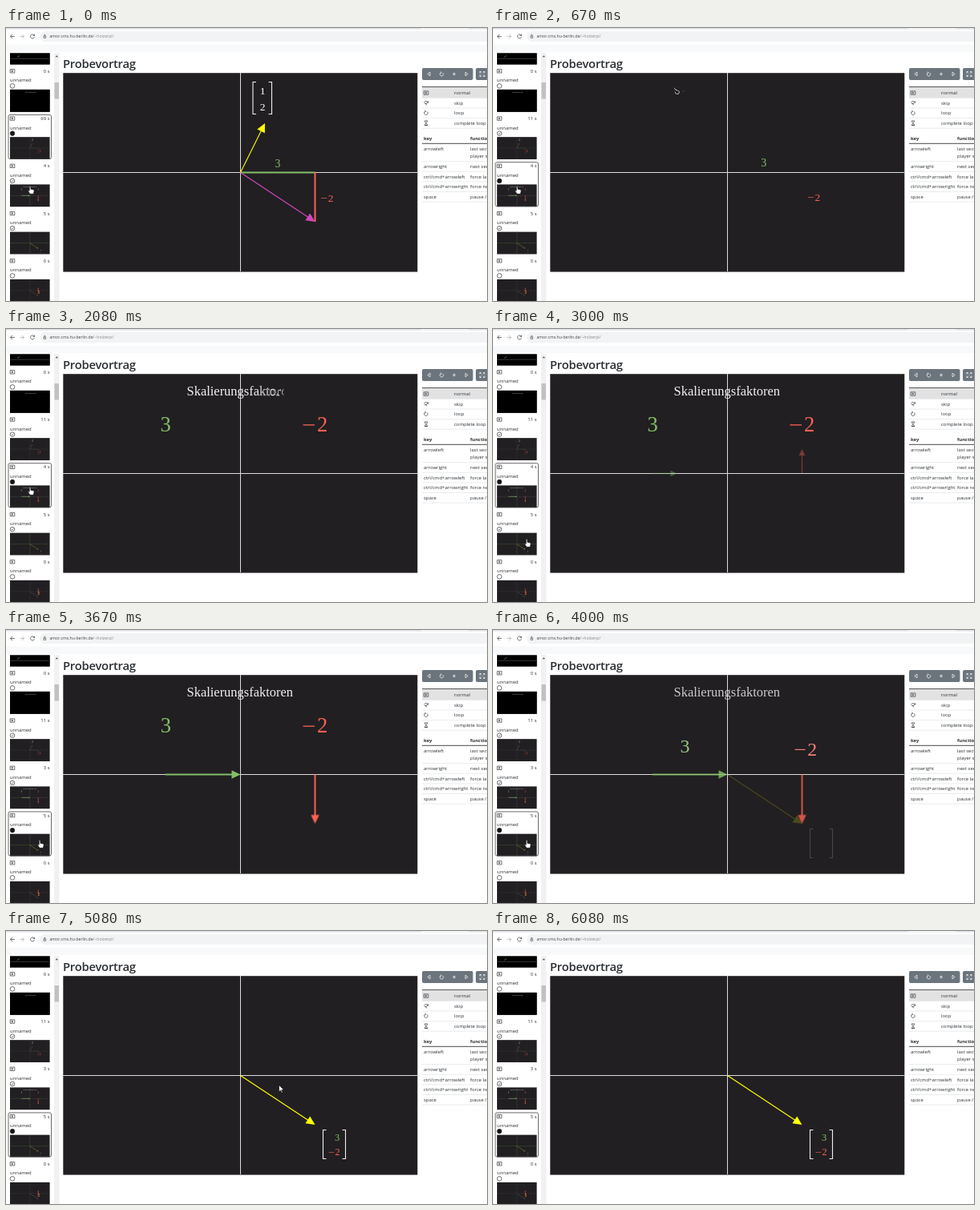
An HTML page that plays this animation: 600x341 px, repeating every 6160 ms.

```html
<!DOCTYPE html>
<html lang="de">
<head>
<meta charset="utf-8">
<title>Probevortrag</title>
<style>
html, body { margin: 0; width: 100%; height: 100%; overflow: hidden; background: #fff; }
svg { display: block; width: 100vw; height: 100vh; }
text { font-family: "Open Sans", "Noto Sans", sans-serif; font-size: 5.95px; fill: #2b2f33; }
.math text, text.math { font-family: "Liberation Serif", serif; }
.icon { fill: none; stroke: #33373b; stroke-width: .7; }
</style>
</head>
<body>
<svg id="stage" viewBox="0 0 600 341"></svg>
<script>
const LOOP = 6160, CLICK_1 = 500, CLICK_2 = 3480;
const WRITE = 580, FADE_IN = 2540, COMBINE = 3644;
const GREEN = '#83c167', RED = '#fc6255', YELLOW = '#ffff00', PINK = '#d147bd';
const DARK = '#211f22', TITLE = 'Skalierungsfaktoren';
const stage = document.getElementById('stage');

const clamp = v => Math.max(0, Math.min(1, v));
const lerp = (a, b, k) => a + (b - a) * k;
const sigmoid = v => 1 / (1 + Math.exp(-v));
const smooth = v => {
  const e = sigmoid(-5);
  return clamp((sigmoid(10 * (clamp(v) - .5)) - e) / (1 - 2 * e));
};
const ease = v => { v = clamp(v); return v * v * (3 - 2 * v); };
const pale = (hex, k) => 'rgb(' + [1, 3, 5].map(i =>
  Math.round(lerp(parseInt(hex.slice(i, i + 2), 16), 225, k))) + ')';

const rect = (x, y, w, h, fill, extra = '') =>
  `<rect x="${x}" y="${y}" width="${w}" height="${h}" fill="${fill}" ${extra}/>`;
const line = (x1, y1, x2, y2, color, w = 1) =>
  `<path d="M${x1} ${y1}L${x2} ${y2}" stroke="${color}" stroke-width="${w}" fill="none"/>`;
const text = (x, y, s, extra = '') => `<text x="${x}" y="${y}" ${extra}>${s}</text>`;
const icon = (x, y, d, extra = '') =>
  `<path class="icon" transform="translate(${x} ${y})" d="${d}" ${extra}/>`;
const group = (id, body, extra = '') => `<g id="${id}" ${extra}>${body}</g>`;

function arrow(x1, y1, x2, y2, color, w, head = 11) {
  const angle = Math.atan2(y2 - y1, x2 - x1) * 180 / Math.PI;
  const len = Math.hypot(x2 - x1, y2 - y1);
  return `<g transform="translate(${x1} ${y1}) rotate(${angle})">
    ${line(0, 0, len - head + 1, 0, color, w)}
    <path d="M${len} 0l${-head} ${-head * .48}v${head * .96}z" fill="${color}"/></g>`;
}

const brackets = (l, r, t, b) =>
  `<path d="M${l + 4} ${t}H${l}V${b}h4M${r - 4} ${t}H${r}V${b}h-4" fill="none" stroke="#eee" stroke-width="1.1"/>`;
const digit = (x, y, s, size, fill) =>
  text(x, y + size * .34, s, `text-anchor="middle" style="font-size:${size}px;fill:${fill}"`);
const axes = (color, w) => line(71, 180.5, 513, 180.5, color, w) + line(292.5, 56, 292.5, 304, color, w);

const PLAY_BOX = 'M-2.8-2.2h5.6v4.4h-5.6zM-.8-1.1v2.2l1.8-1.1z';
const TURN = 'M-.8-2.1A2.2 2.2 0 1 0 1.2-1.8M-1.6-3.2l1.4 1-1.2 1.2';

function browser() {
  return rect(0, 0, 600, 341, '#fff') + rect(0, 0, 600, 1.6, '#dee1e6') + rect(518, 0, 59, 1.6, '#f4f5f6') +
    rect(42, 4, 580, 13, '#f1f3f4', 'rx="6.5"') + rect(0, 20.5, 600, 9.5, '#f8f9fa') +
    icon(8, 10.5, 'M2.7 0H-2.5M0-2.6L-2.6 0 0 2.6') +
    icon(20, 10.5, 'M-2.7 0H2.5M0-2.6L2.6 0 0 2.6', 'style="stroke:#aaa"') +
    icon(33, 10.5, 'M2.2-1.3A2.5 2.5 0 1 0 2.4.8M2.5-2.8v1.9H.6') +
    icon(48.3, 10.5, 'M-1.3-.3h2.6v2.2h-2.6zM-.8-.4v-1a.8.8 0 0 1 1.6 0v1', 'style="stroke:#555"') +
    text(54.5, 12.3, 'amor.cms.hu-berlin.de<tspan fill="#888">/~holzerpi/</tspan>',
      'style="font-size:5.1px;fill:#444"');
}

function thumb(i, y) {
  const scenes = [
    rect(71, 56, 442, 248, '#000') + line(75, 240, 505, 240, '#666', 5) + line(150, 225, 180, 205, GREEN, 5),
    rect(71, 56, 442, 248, '#000') + digit(300, 82, 'Probevortrag', 20, '#bbb'),
    axes('#3a383b', 4) + arrow(292, 180, 318, 125, '#555', 4, 14) + digit(320, 90, '2', 30, '#bbb') +
      line(292, 180, 385, 180, '#37482f', 5) + line(385, 180, 385, 242, '#7d3833', 5) + digit(405, 212, '2', 26, RED),
    axes('#4b494c', 4) + digit(292, 78, TITLE, 17, '#bbb') + arrow(199, 180, 292, 180, GREEN, 5, 16) +
      arrow(385, 180, 385, 242, RED, 5, 16) + digit(199, 119, '3', 26, GREEN) + digit(385, 119, '2', 26, RED),
    axes('#466035', 4) + arrow(292, 180, 385, 242, '#8f8b35', 4, 16) +
      digit(413, 258, '3', 20, '#ddd') + digit(411, 280, '2', 20, RED),
    axes('#3a383b', 4) + arrow(292, 180, 385, 242, '#555', 4, 14) +
      line(385, 150, 385, 205, RED, 6) + digit(392, 205, '2', 44, '#ff8b3d')
  ];
  return `<g transform="translate(5 ${y}) scale(.1122) translate(-71 -56)">
    ${rect(71, 56, 442, 248, DARK)}${scenes[i]}</g>`;
}

function sidebar() {
  let out = '';
  for (let i = 0; i < 6; i++) {
    const y = 53.8 + (i - 1) * 59.25;
    out += thumb(i, y + 23.1);
    if (!i) continue;
    out += icon(8, y, PLAY_BOX) + text(54.5, y + 2, '0 s', `id="time${i}" text-anchor="end"`) +
      text(5, y + 13.6, 'unnamed') +
      `<circle cx="8" cy="${y + 18.6}" r="2.8" class="icon" id="dot${i}"/>` +
      icon(8, y + 18.6, 'M-1.3 0l1 1 1.7-1.9', `id="check${i}"`);
  }
  return `<g clip-path="url(#side)">${out}</g>` +
    `<rect id="select" x="3" width="53.5" height="55" rx="2" fill="none" stroke="#444" stroke-width=".8"/>` +
    rect(60, 31, 6.5, 310, '#f1f1f1') + rect(60.5, 68, 5.5, 20.5, '#c1c1c1') +
    '<path d="M61.5 36.2l1.8-2 1.8 2z" fill="#555"/>';
}

function panel() {
  const white = 'style="stroke:#fff"';
  let out = rect(519, 50, 63.5, 15, '#6c757d', 'rx="2"') + rect(586, 50, 24, 15, '#6c757d', 'rx="2"') +
    icon(527.5, 57.5, 'M1.5-2.3v4.6L-1.7 0z', white) + icon(543.5, 57.8, TURN, white) +
    icon(559, 57.5, 'M-1-1h2v2h-2z', white) + icon(574.5, 57.5, 'M-1.5-2.3v4.6L1.7 0z', white) +
    icon(594, 57.5, 'M-3-1v-2h2M1-3h2v2M3 1v2h-2M-1 3h-2v-2M-3-3l2 2M3-3l-2 2M3 3l-2-2M-3 3l2-2', white) +
    rect(519, 74.5, 81, 12.6, '#e2e2e3');
  const marks = [PLAY_BOX, 'M-2.8-.4q2.8-3.2 5.3-.2M2.6-2.4v2H.7M-2 .8h3M-.5.8l1.2 2', TURN,
    'M-2-2.8h4M-2 2.8h4M-1.5-2.8q0 1.8 1.5 2.8q-1.5 1-1.5 2.8h3q0-1.8-1.5-2.8q1.5-1 1.5-2.8'];
  ['normal', 'skip', 'loop', 'complete loop'].forEach((s, i) => {
    const y = 81 + i * 12.6;
    out += icon(524, y, marks[i]) + text(559, y + 2.2, s) + line(519, y + 6.4, 600, y + 6.4, '#dee2e6', .7);
  });
  out += line(519, 73.6, 600, 73.6, '#333', .9) +
    text(521, 140.2, 'key', 'font-weight="700"') + text(579, 140.2, 'function', 'font-weight="700"') +
    line(519, 144.3, 600, 144.3, '#333', .9);
  [['arrowleft', 'last section', 153.3, 166.6], ['arrowright', 'next section', 175.2, 179.3],
   ['ctrl/cmd+arrowleft', 'force last', 187.8, 191.9], ['ctrl/cmd+arrowright', 'force next', 200.4, 204.5],
   ['space', 'pause / play', 213, 217.1]].forEach(([key, use, y, rule]) => {
    out += text(521, y, key) + text(579, y, use) + line(519, rule, 600, rule, '#dee2e6', .7);
  });
  return out + text(579, 162.2, 'player start');
}

function scene() {
  const letters = [...TITLE].map(c => `<tspan>${c}</tspan>`).join('');
  const old = line(292.5, 180.5, 386, 180.5, GREEN, 2) + line(385.5, 180, 385.5, 242, RED, 2) +
    arrow(292.5, 180.5, 323, 119, YELLOW, 1.1) + arrow(292.5, 180.5, 385.5, 242, PINK, 1.1) +
    brackets(308, 331.5, 67.5, 107.5) + digit(320, 78, '1', 13.5, '#fff') + digit(320, 98, '2', 13.5, '#fff');
  return rect(71.3, 56.2, 442, 248.4, DARK) + axes('#dcdcdc', 1) +
    group('old', old) +
    text(225.5, 83, letters, 'id="title" class="math" style="font-size:16.45px;fill:#f2f2f2;stroke:#fff;stroke-width:.6"') +
    group('units', arrow(199, 180.5, 229.5, 180.5, GREEN, 1.3, 8) + arrow(385.5, 180.5, 385.5, 150, RED, 1.3, 8)) +
    group('scaled', arrow(199, 180.5, 292.5, 180.5, GREEN, 2) + arrow(385.5, 180.5, 385.5, 242, RED, 2)) +
    group('sum', arrow(292.5, 180.5, 385.5, 242, YELLOW, 1.2) + brackets(395.5, 423.5, 248.5, 284.5)) +
    group('three', text(0, 9, '3', 'text-anchor="middle" style="font-size:26.5px;fill:inherit"')) +
    group('two', '<path d="M-15 .2h14.5v1.3h-14.5z"/>' +
      text(9, 9, '2', 'text-anchor="middle" style="font-size:26.5px;fill:inherit"'));
}

stage.innerHTML = '<clipPath id="side"><path d="M0 31.5H60V341H0z"/></clipPath>' +
  browser() + text(71, 50.2, 'Probevortrag', 'style="font-size:14.8px;font-weight:600;letter-spacing:-.25px"') +
  sidebar() + panel() + group('math', scene(), 'class="math"') +
  group('cursor',
    '<path id="hand" d="M-.8.8q.9-1.3 1.7 0v3.4l3.4.8q1 .4.8 1.6l-.7 3.7h-4.5l-2.6-4q.4-1.2 1.9.1z"/>' +
    '<path id="pointer" d="M0 0v8.6l2-1.9 1.4 3.1 1.3-.6-1.4-3 2.8-.2z"/>',
    'fill="#fff" stroke="#111" stroke-width=".7"');

const $ = id => document.getElementById(id);
const show = (id, opacity) => $(id).setAttribute('opacity', opacity);
const tspans = [...$('title').children];

function place(id, color, stops, a, b) {
  const [x, y, s] = stops[0].map((v, i) => lerp(lerp(v, stops[1][i], a), stops[2][i], b));
  $(id).setAttribute('transform', `translate(${x} ${y}) scale(${s})`);
  $(id).setAttribute('fill', pale(color, 1.6 * (a * (1 - a) + b * (1 - b))));
}

function drawSidebar(t) {
  const active = t < CLICK_1 ? 3 : t < CLICK_2 ? 4 : 5;
  const row = active - 1;
  $('select').setAttribute('y', 49.2 + (row - 1) * 59.25);
  const times = ['0', t < CLICK_1 ? '69' : '11', t < CLICK_2 ? '4' : '3', '5', '0'];
  times.forEach((s, n) => {
    const i = n + 1, done = i > 1 && i < 5;
    $('time' + i).textContent = s + ' s';
    $('dot' + i).style.fill = i === row ? '#111' : 'none';
    show('check' + i, done && i !== row ? 1 : 0);
  });
}

// Each letter is outlined first, then filled while its outline fades.
function drawTitle(t, opacity) {
  const lag = .2, unit = 2000 / (1 + (TITLE.length - 1) * lag);
  tspans.forEach((s, i) => {
    const k = clamp((t - WRITE) / unit - i * lag), fill = clamp(k * 2 - 1);
    s.style.strokeDasharray = k < .5 ? `${k * 80} 100` : 'none';
    s.style.strokeOpacity = k > 0 ? 1 - fill : 0;
    s.style.fillOpacity = fill;
  });
  show('title', opacity);
}

function drawCursor(t) {
  const down = ease((t - 2250) / 500), out = ease((t - 4700) / 720);
  const x = lerp(lerp(30, 42, down), 591, out), y = lerp(lerp(197, 262, down), 134, out);
  $('cursor').setAttribute('transform', `translate(${x} ${y})`);
  show('cursor', t < 5420 ? 1 : 0);
  show('hand', x < 58 ? 1 : 0);
  show('pointer', x < 58 ? 0 : 1);
}

function render(t) {
  const lift = smooth((t - WRITE) / 1000), join = smooth((t - COMBINE) / 1000);
  drawSidebar(t);
  drawTitle(t, 1 - join);
  show('old', t < CLICK_1 ? 1 : 0);
  show('units', t < CLICK_2 ? smooth((t - FADE_IN) / 1000) : 0);
  show('scaled', t < CLICK_2 ? 0 : 1 - join);
  show('sum', join);
  place('three', GREEN, [[339, 169, .52], [199, 119, 1], [413, 258, .47]], lift, join);
  place('two', RED, [[400.5, 212, .5], [385.5, 119, 1], [409.5, 276, .46]], lift, join);
  drawCursor(t);
}

function tick() {
  render(performance.now() % LOOP);
  requestAnimationFrame(tick);
}
tick();
</script>
</body>
</html>
```
